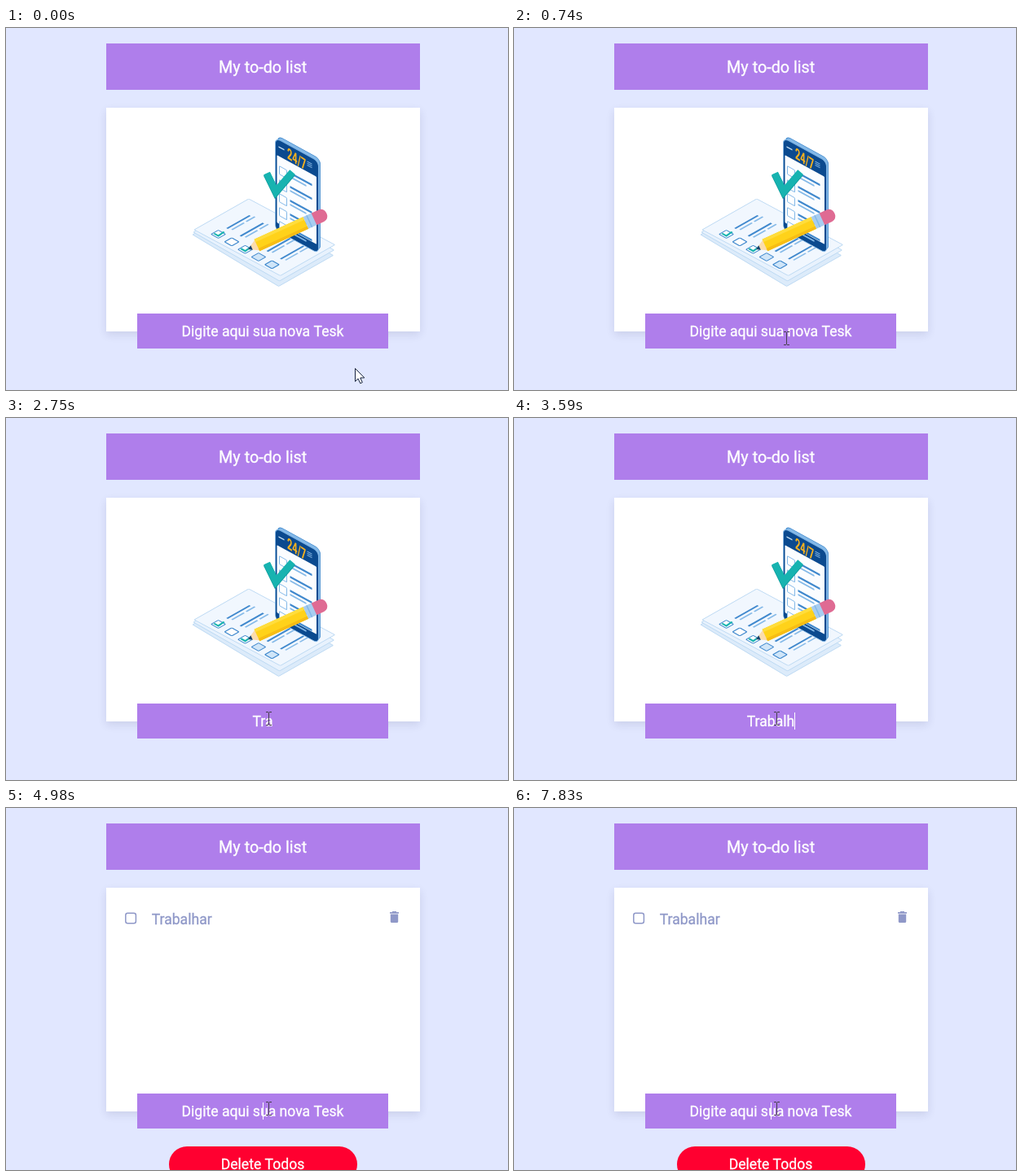
These frames come from a looping animation (616 by 445 pixels, 8000 ms). An HTML page with a canvas:

```html
<!DOCTYPE html>
<html lang="pt">
<head>
<meta charset="utf-8">
<title>My to-do list</title>
<style>
html, body { margin: 0; width: 616px; height: 445px; overflow: hidden; background: #e1e7ff; }
canvas { display: block; }
</style>
</head>
<body>
<canvas id="stage" width="616" height="445"></canvas>
<script>
const ctx = document.getElementById('stage').getContext('2d');
const LOOP = 8000, CLICK = 860, SUBMIT = 4980, BLINK = 530;
const PURPLE = '#af7eeb', SLATE = '#8f98c8', NAVY = '#0b4a8f', BLUE = '#3f88cd', SKY = '#84b9e8', TEAL = '#17b3b0';
const HINT = 'Digite aqui sua nova Tesk', WORD = 'Trabalhar';
const KEY_TIMES = [1910, 2140, 2190, 2930, 3260, 3360, 3590, 3690, 4630];
const STOPS = [[428, 418], [488, 426], [437, 412], [396, 404], [345, 392], [322, 369]];
const MOVE_START = 100, MOVE_STEP = 70, STOP_GAP = 140;

function box(x, y, w, h, color) {
  ctx.fillStyle = color;
  ctx.fillRect(x, y, w, h);
}

function path(points, color, width) {
  ctx.beginPath();
  for (const [x, y] of points) ctx.lineTo(x, y);
  if (width) {
    ctx.strokeStyle = color;
    ctx.lineWidth = width;
    ctx.stroke();
  } else {
    ctx.fillStyle = color;
    ctx.fill();
  }
}

function round(x, y, w, h, r, fill, stroke, width = 1) {
  ctx.beginPath();
  ctx.roundRect(x, y, w, h, r);
  if (fill) { ctx.fillStyle = fill; ctx.fill(); }
  if (stroke) { ctx.strokeStyle = stroke; ctx.lineWidth = width; ctx.stroke(); }
}

function label(text, x, y, color = '#fff', size = 17.6, align = 'center') {
  ctx.font = `${size}px Roboto, sans-serif`;
  ctx.textAlign = align;
  ctx.fillStyle = ctx.strokeStyle = color;
  ctx.lineWidth = 0.3;
  ctx.fillText(text, x, y);
  ctx.strokeText(text, x, y);
}

// Runs a drawing in a plane with the given origin and axes.
function plane(x, y, [a, b], [c, d], drawing) {
  ctx.save();
  ctx.transform(a, b, c, d, x, y);
  drawing();
  ctx.restore();
}

function drawPapers() {
  const across = [0.88, 0.5], away = [0.88, -0.5];
  for (let i = 0; i < 3; i++) {
    plane(229 + i, 254 - 3 * i, [0.88, 0.53 - 0.03 * i], [0.88, -0.5], () =>
      round(0, 0, 120, 76, 1, ['#dcebfa', '#e8f2fd', '#f1f7fe'][i], '#bcd9f3'));
  }
  plane(228, 250, across, away, () => {
    for (let i = 0; i < 5; i++) {
      const u = 22 + 18.7 * i;
      round(u - 5, 10, 10, 10, 1, i > 2 ? '#cfe5f8' : '#fff', BLUE, 1.2);
      box(u - 2, 28, 2.2, 32, BLUE);
      box(u + 3, 30, 1.8, 17, SKY);
      box(u + 3, 50, 1.8, 12, SKY);
      if (i === 0 || i === 2) path([[u - 4, 13], [u + 2, 13], [u + 1, 22]], TEAL, 2.4);
    }
  });
}

function drawPhone() {
  const slope = [1, 0.55], down = [0, 1];
  plane(333.5, 132.5, slope, down, () => round(0, 0, 52, 113, 6, SKY, BLUE, 0.8));
  plane(330.5, 135, slope, down, () => {
    round(0, 0, 53, 113, 6, NAVY, SKY, 0.8);
    round(2, 20, 48.5, 83, 1, '#fbfdff');
    box(4, 8, 7, 1.5, '#c7e1f7');
    for (let i = 0; i < 3; i++) box(39, 7 + 2.3 * i, 6, 1, '#8fbfea');
    for (let i = 0; i < 5; i++) {
      const y = 32 + 17 * i;
      round(5, y, 9, 10, 1, '#fff', SKY);
      box(18, y, 27, 2.6, BLUE);
      box(18, y + 5, 20, 2, SKY);
    }
  });
  plane(345, 160, [0.58, 0.38], down, () => {
    ctx.font = 'bold 19px Roboto, sans-serif';
    ctx.textAlign = 'left';
    ctx.fillStyle = '#f9b21d';
    ctx.fillText('24/7', 0, 0);
  });
}

function drawTick() {
  const tick = [[320, 178.5], [331, 201], [351.5, 177]];
  path(tick.map(([x, y]) => [x, y + 1]), '#0e9d9e', 9);
  path(tick, TEAL, 8.5);
}

function drawPencil() {
  ctx.save();
  ctx.translate(297, 272);
  ctx.rotate(-0.43);
  path([[0, 0], [14, -8], [14, 8]], '#fbdcae');
  path([[0, 0], [5, -3], [5, 3]], '#17406f');
  box(12, -8, 66, 16, '#ffd21a');
  box(12, -8, 66, 4, '#ffdd3c');
  box(12, 4.5, 66, 3.5, '#f7bd14');
  box(78, -8, 12, 16, '#a8cdf0');
  box(82, -8, 1.5, 16, SKY);
  round(89, -8, 17, 16, [1, 7, 7, 1], '#df6b93');
  ctx.restore();
}

function drawTask() {
  round(146.8, 129.3, 12.6, 12.4, 2.5, null, SLATE, 1.5);
  label(WORD, 178.7, 143, SLATE, 17.6, 'left');
  box(471, 128, 11, 1.7, SLATE);
  box(474, 127, 5, 1.5, SLATE);
  round(471.8, 130.6, 9.4, 10.4, [0, 0, 1.6, 1.6], SLATE);
  round(200, 416, 231, 44, 22, '#ff0030');
  label('Delete Todos', 315, 444);
}

function drawInput(t) {
  box(161, 351, 308, 43, PURPLE);
  const pressed = KEY_TIMES.filter(k => k <= t);
  const typed = t < SUBMIT ? WORD.slice(0, pressed.length) : '';
  label(typed || HINT, 315, 379);

  // The blink restarts with the click and with every key.
  const since = t - (pressed.at(-1) ?? CLICK);
  if (since >= 0 && Math.floor(since / BLINK) % 2 === 0) {
    const half = typed ? ctx.measureText(typed).width / 2 : 0;
    box(Math.floor(315.6 + half), 362, 1, 21, '#fff');
  }
}

function pointerAt(t) {
  const held = MOVE_STEP * Math.floor(Math.max(0, t - MOVE_START) / MOVE_STEP);
  const place = Math.min(held / STOP_GAP, STOPS.length - 1);
  const from = STOPS[Math.floor(place)], to = STOPS[Math.ceil(place)];
  return from.map((v, i) => Math.round(v + (to[i] - v) * (place % 1)));
}

function drawPointer(t) {
  const [x, y] = pointerAt(t);
  ctx.save();
  ctx.translate(x, y);
  if (y < 394 && x < 469) {
    box(0, -7, 1, 15, '#453f4a');
    for (const end of [-8, 8]) {
      box(-3, end, 3, 1, '#453f4a');
      box(1, end, 3, 1, '#453f4a');
    }
  } else {
    ctx.translate(0.5, 0.5);
    const arrow = [[0, 0], [0, 16], [3.6, 12.6], [6.2, 18.3], [8.8, 17.2], [6.3, 11.5], [11.3, 11.5], [0, 0]];
    path(arrow, '#fff');
    path(arrow, '#17243f', 1);
  }
  ctx.restore();
}

function draw(t) {
  box(0, 0, 616, 445, '#e1e7ff');
  box(123, 19, 385, 57, PURPLE);
  label('My to-do list', 315.2, 55, '#fff', 19.8);

  ctx.save();
  ctx.shadowColor = 'rgba(40, 45, 90, 0.12)';
  ctx.shadowBlur = 10;
  ctx.shadowOffsetY = 4;
  box(123, 98, 385, 275, '#fff');
  ctx.restore();

  if (t < SUBMIT) {
    drawPapers();
    drawPhone();
    drawTick();
    drawPencil();
  } else {
    drawTask();
  }
  drawInput(t);
  drawPointer(t);
}

const start = performance.now();
function frame() {
  draw((performance.now() - start) % LOOP);
  requestAnimationFrame(frame);
}
frame();
</script>
</body>
</html>
```
